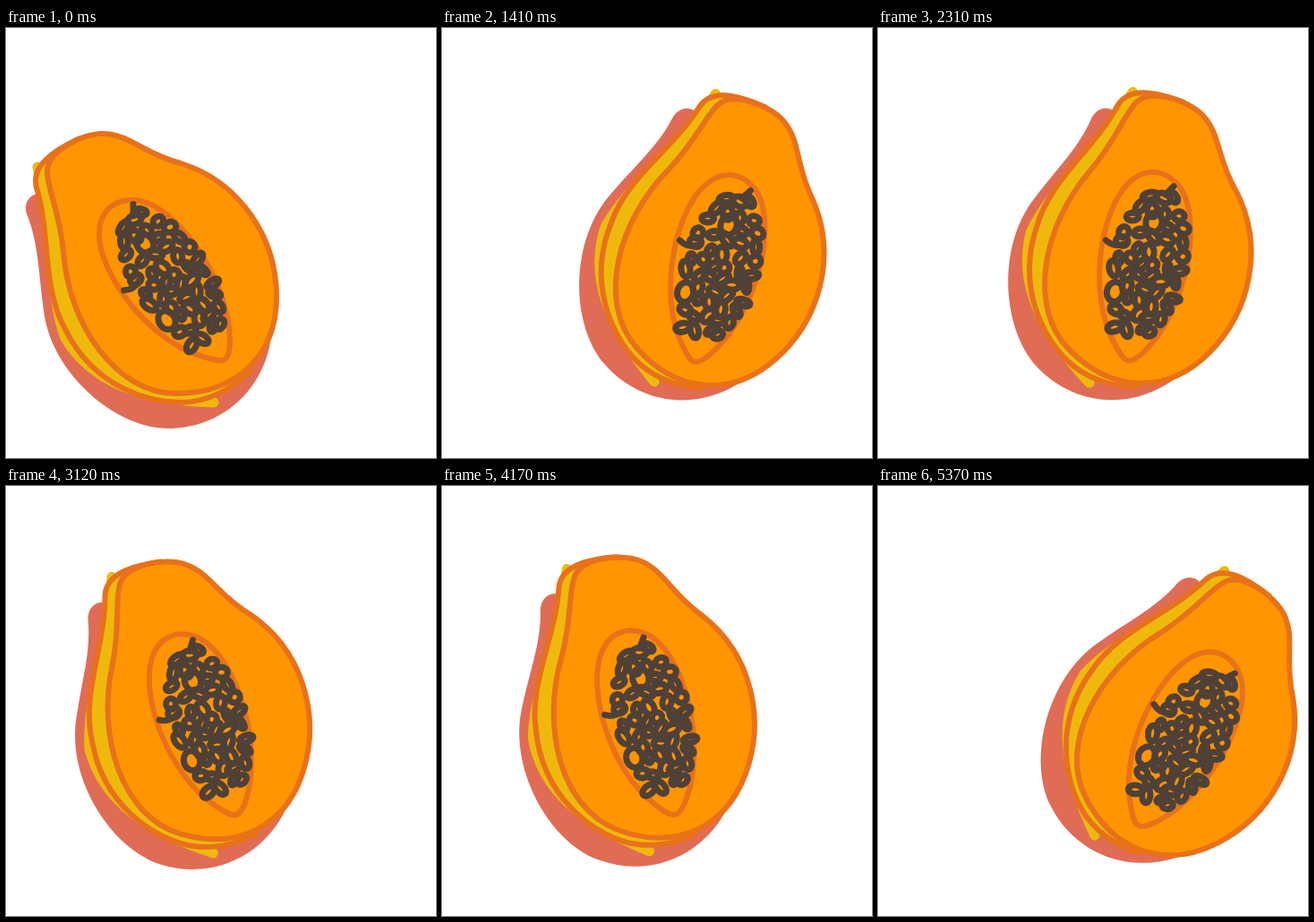
Recreate the animation shown at these times as an HTML page. Size 480x480 px, loop 5400 ms.

```html
<!DOCTYPE html>
<html lang="en">
<head>
<meta charset="utf-8">
<title>Rocking papaya</title>
<style>
html, body { margin: 0; width: 100%; height: 100%; overflow: hidden; background: #fff; }
svg { display: block; width: 100vw; height: 100vh; }
path { stroke-linecap: round; stroke-linejoin: round; }
.skin { fill: #e06c55; }
.rind { fill: #efb90c; stroke: #efb90c; stroke-width: 11; }
.rim { fill: #efb90c; stroke: #e8711a; stroke-width: 6; }
.flesh { fill: #ff9500; stroke: #e8711a; stroke-width: 6; }
#seeds { fill: none; stroke: #4f4138; stroke-width: 7; }
</style>
</head>
<body>
<svg viewBox="0 0 480 480">
  <g id="fruit">
    <path class="skin" d="M296 345C288 405 240 447 181 447S50 385 42 315C36 270 36 240 24 210C16 190 36 178 45 190Z"/>
    <path class="rind" d="M35 155C52 215 48 300 66 346C95 395 150 416 232 418"/>
    <path class="rim" d="M83 123C50 138 28 155 34 178C50 230 40 290 66 336C100 405 165 418 195 418S255 402 272 383"/>
    <path class="flesh" d="M107 118C138 118 152 140 195 151C262 172 302 235 302 300S258 408 190 408S70 330 64 250C60 205 46 180 46 160C46 138 85 118 107 118Z"/>
    <path class="flesh" d="M141 192C187 192 250 280 250 350C250 378 238 372 220 367C160 350 104 275 104 230C104 205 120 192 141 192Z"/>
    <g id="seeds" transform="translate(182 284) rotate(57)">
      <path d="M-95-14L-84-7M-20 47Q-14 37-20 27"/>
    </g>
  </g>
</svg>
<script>
const fruit = document.getElementById('fruit');
const seeds = document.getElementById('seeds');

let seed = 7;
const random = () => (seed = seed * 16807 % 2147483647) / 2147483647;
const between = (a, b) => a + (b - a) * random();

function loop(x, y, rx, ry, angle = 0) {
  const el = document.createElementNS('http://www.w3.org/2000/svg', 'ellipse');
  const attrs = { cx: x, cy: y, rx, ry, transform: `rotate(${angle} ${x} ${y})` };
  for (const key in attrs) el.setAttribute(key, attrs[key]);
  seeds.append(el);
}

// Two wide loops stay open; the rest fill a blunt oval in jittered rows
const open = [[-51, -1], [34, 25]];
open.forEach(([x, y]) => loop(x, y, 11, 9));

const GAP = 15;
for (let x = -80; x <= 80; x += GAP) {
  const half = 34 * (1 - Math.abs(x / 95) ** 3);
  const count = Math.max(1, Math.round(2 * half / GAP));
  for (let i = 0; i <= count; i++) {
    const px = x + between(-3, 3);
    const py = -5 + half * (2 * i / count - 1) + between(-3, 3);
    const [rx, ry, angle] = [between(6, 9), between(3.5, 6), between(0, 180)];
    if (open.every(([ox, oy]) => Math.hypot(px - ox, py - oy) > 12)) loop(px, py, rx, ry, angle);
  }
}

// Steady rocking about a point near the base, one and a half swings per loop
const LOOP = 5400, STEP = 30, SWING = 178 / 3, ANGLE = 63;

function draw() {
  const step = Math.max(0, Math.floor(performance.now() % LOOP / STEP) - 1);
  const turn = ANGLE * (1 - Math.abs(1 - step / SWING % 2));
  fruit.setAttribute('transform', `rotate(${turn} 260 412)`);
  requestAnimationFrame(draw);
}
draw();
</script>
</body>
</html>
```
